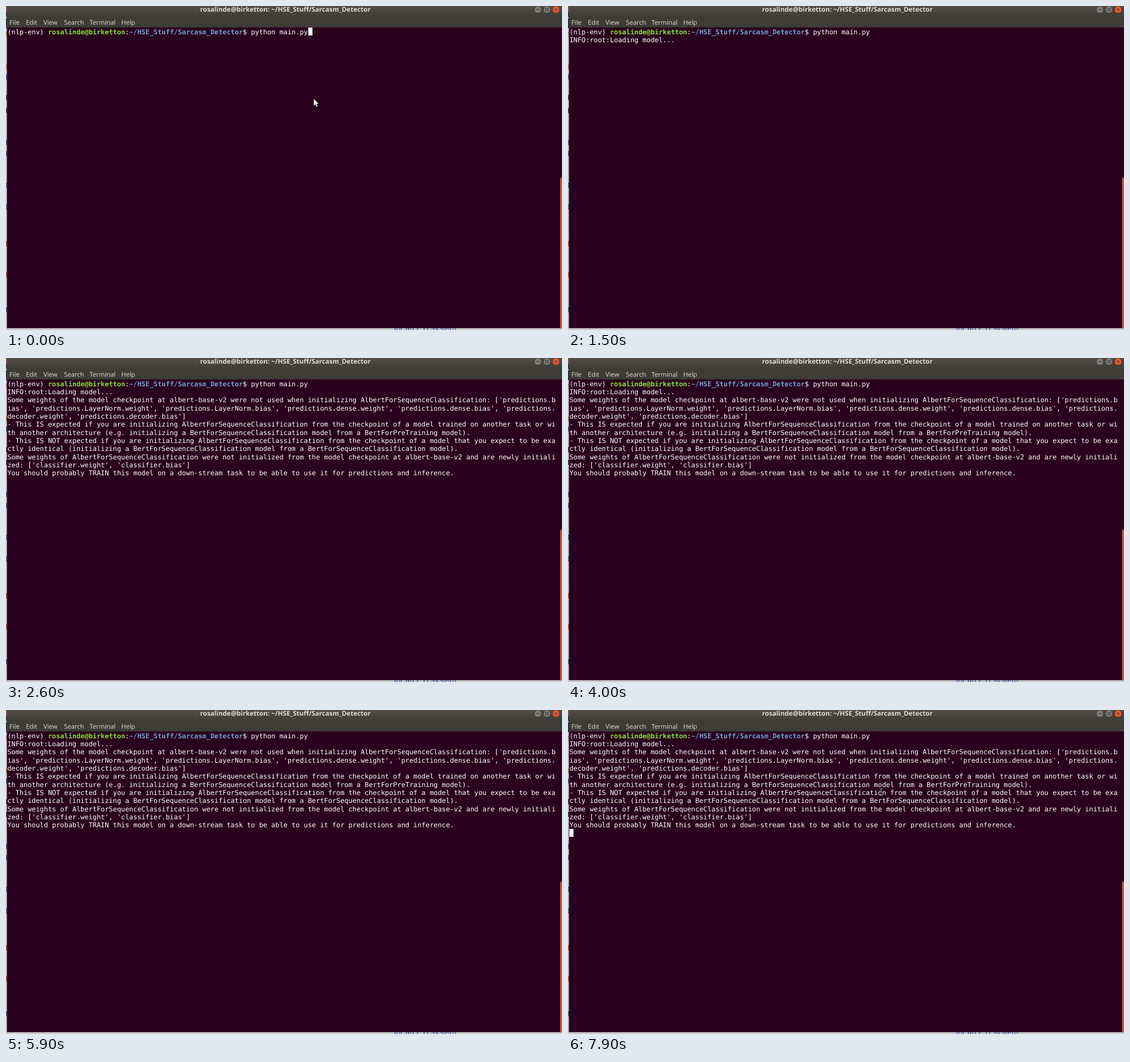
Recreate the animation shown at these times as an HTML page. Size 979x572 px, loop 8000 ms.

```html
<!DOCTYPE html>
<html lang="en">
<head>
<meta charset="utf-8">
<title>Terminal</title>
<style>
  html, body { margin: 0; width: 100%; height: 100%; overflow: hidden; background: #29001e; }
  svg { display: block; width: 979px; height: 572px; }
  text { white-space: pre; text-rendering: geometricPrecision; }
  #term { font: 11.893px "DejaVu Sans Mono", monospace; fill: #fff; }
  .user { font-weight: bold; fill: #8ae234; }
  .path { font-weight: bold; fill: #729fcf; }
  .title { font: bold 11.6px "Open Sans", sans-serif; fill: #dfdbd2; text-anchor: end; }
  .menu { font: 11.3px "Open Sans", sans-serif; fill: #dfdbd2; }
  .behind { font: 14px "Liberation Sans", Arial, sans-serif; fill: #2a5a9c; }
</style>
</head>
<body>
<svg viewBox="0 0 979 572">
  <defs>
    <linearGradient id="bar" x2="0" y2="1">
      <stop offset="0" stop-color="#524e47"/>
      <stop offset="1" stop-color="#3d3c36"/>
    </linearGradient>
  </defs>

  <!-- page behind the window -->
  <rect width="979" height="572" fill="#c9c6c8"/>
  <text class="behind" x="683" y="573.3">for an ETI system</text>
  <g id="scraps"></g>

  <!-- window -->
  <rect x="1.6" y="37" width="978" height="531.7" fill="#29001e"/>
  <rect x="1" width="978" height="19" fill="url(#bar)"/>
  <rect x="1" y="18" width="978" height="19.8" fill="#3d3c36"/>
  <text class="title" x="642" y="10.4">rosalinde@birketton: ~/HSE_Stuff/Sarcasm_Detector</text>
  <g class="menu">
    <text x="6" y="32.6">File</text>
    <text x="35" y="32.6">Edit</text>
    <text x="66" y="32.6">View</text>
    <text x="102" y="32.6">Search</text>
    <text x="147" y="32.6">Terminal</text>
    <text x="203" y="32.6">Help</text>
  </g>
  <g stroke="#34332e" fill="#7d7b73">
    <circle cx="936.5" cy="6.3" r="6.5"/>
    <circle cx="952.5" cy="6.3" r="6.5"/>
    <circle cx="968.5" cy="6.3" r="6.5" fill="#e8592f"/>
    <path fill="none" d="M934 6.5h5M950.3 4.2h4.4v4.2h-4.4zM966.3 4.1l4.4 4.4m0-4.4l-4.4 4.4"/>
  </g>
  <path d="M975.8 568.7V305q0-2 1.6-2H979V568.7z" fill="#cf5a3d"/>

  <g id="term">
    <text x="2.4" y="49.8">(nlp-env) <tspan class="user">rosalinde@birketton</tspan>:<tspan class="path">~/HSE_Stuff/Sarcasm_Detector</tspan>$ python main.py</text>
  </g>
  <rect id="cursor" width="7.3" height="14" fill="#fff"/>

  <path id="arrow" d="M541.7 163.5v13.2l3-2.8 2.1 4.6 2.3-1-2-4.5h3.9z" fill="#fff" stroke="#111" stroke-width=".7"/>
  <g id="beam" fill="none">
    <path d="M.8 1h2l.7.7.7-.7h2M3.5 1.5v11M.8 13h2l.7-.7.7.7h2" stroke="#000" stroke-width="2"/>
    <path d="M.8 1h2l.7.7.7-.7h2M3.5 1.5v11M.8 13h2l.7-.7.7.7h2" stroke="#ddd" stroke-width=".9"/>
  </g>
</svg>

<script>
const LOOP = 8000, COLS = 135, LEFT = 2.4, TOP = 38.1, CELL_W = 7.16, CELL_H = 14.32;
const $ = id => document.getElementById(id);

function add(parent, tag, attrs, content = '') {
  const node = document.createElementNS('http://www.w3.org/2000/svg', tag);
  for (const key in attrs) node.setAttribute(key, attrs[key]);
  node.textContent = content;
  return parent.appendChild(node);
}

const output = [
  { at: 1500, lines: ['INFO:root:Loading model...'] },
  { at: 2600, lines: [
    "Some weights of the model checkpoint at albert-base-v2 were not used when initializing AlbertForSequenceClassification: ['predictions.bias', 'predictions.LayerNorm.weight', 'predictions.LayerNorm.bias', 'predictions.dense.weight', 'predictions.dense.bias', 'predictions.decoder.weight', 'predictions.decoder.bias']",
    '- This IS expected if you are initializing AlbertForSequenceClassification from the checkpoint of a model trained on another task or with another architecture (e.g. initializing a BertForSequenceClassification model from a BertForPreTraining model).',
    '- This IS NOT expected if you are initializing AlbertForSequenceClassification from the checkpoint of a model that you expect to be exactly identical (initializing a BertForSequenceClassification model from a BertForSequenceClassification model).',
    "Some weights of AlbertForSequenceClassification were not initialized from the model checkpoint at albert-base-v2 and are newly initialized: ['classifier.weight', 'classifier.bias']",
    'You should probably TRAIN this model on a down-stream task to be able to use it for predictions and inference.'
  ] }
];

let row = 1;
for (const block of output) {
  block.group = add($('term'), 'g', {});
  for (const line of block.lines)
    for (const part of line.match(new RegExp(`.{1,${COLS}}`, 'g')))
      add(block.group, 'text', { x: LEFT, y: 49.8 + CELL_H * row++ }, part);
}

// slivers of the page at the left edge: colour, then top positions
const scraps = {
  '#c8492b': [0, 415, 470],
  '#b87a4a': [45, 103],
  '#2d62a8': [121, 236, 256, 312, 350, 532],
  '#1d2a4a': [10, 22, 30],
  '#3a3338': [157, 180]
};
for (const color in scraps)
  for (const y of scraps[color])
    add($('scraps'), 'rect', { y, width: 1.6, height: 9, fill: color });

// [from, to, row, column] while the block cursor is lit
const cursorOn = [
  [0, 200, 0, 74], [1000, 1100, 1, 0], [1700, 2300, 2, 0], [2900, 4000, 12, 0],
  [4100, 4700, 12, 0], [5300, 5900, 12, 0], [7000, 7100, 12, 0], [7700, LOOP, 12, 0]
];
// [from, to, x, y] of the text pointer
const beamOn = [
  [200, 1000, 540, 159], [7300, 7400, 540, 159], [7400, 7900, 761, 151], [7900, LOOP, 548, 138]
];

const active = (spans, t) => spans.find(([from, to]) => t >= from && t < to);
const show = (node, on) => node.setAttribute('visibility', on ? 'visible' : 'hidden');

function place(node, spans, t, position) {
  const span = active(spans, t);
  show(node, span);
  if (span) node.setAttribute('transform', `translate(${position(span[2], span[3])})`);
}

function draw(now) {
  const t = now % LOOP;
  for (const block of output) show(block.group, t >= block.at);
  show($('arrow'), t < 200);
  place($('cursor'), cursorOn, t, (r, c) => [LEFT + c * CELL_W, TOP + r * CELL_H]);
  place($('beam'), beamOn, t, (x, y) => [x, y]);
}

let start;
function tick(now) {
  start ??= now;
  draw(now - start);
  requestAnimationFrame(tick);
}
draw(0);
requestAnimationFrame(tick);
</script>
</body>
</html>
```
